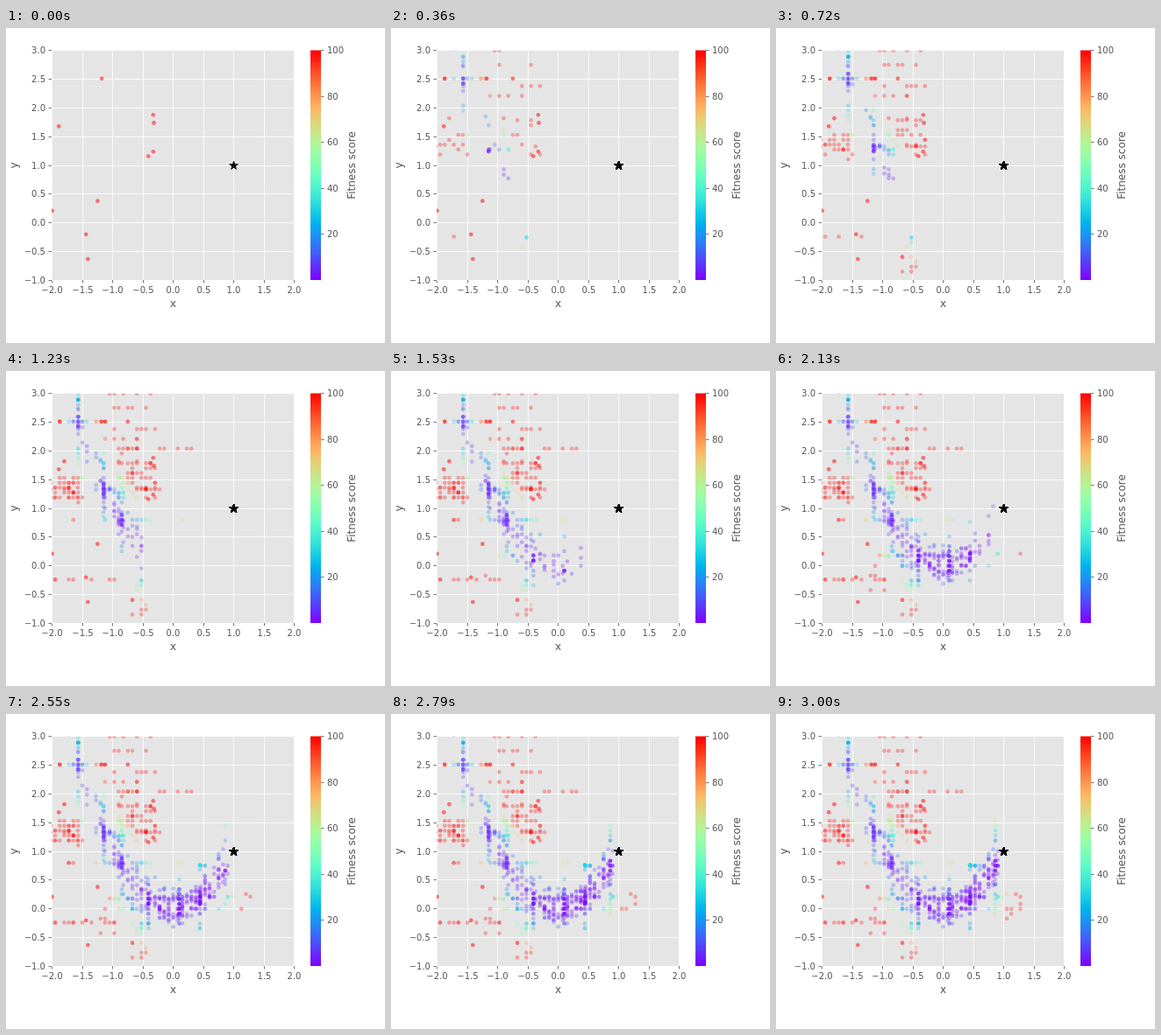
Animation, 432 px wide and 360 px high, one loop 3030 ms. Source, as an HTML page:

```html
<!DOCTYPE html>
<html lang="en">
<head>
<meta charset="utf-8">
<title>Fitness search</title>
<style>
html, body { margin: 0; width: 100%; height: 100%; overflow: hidden; background: #fff; }
svg { display: block; width: 432px; height: 360px; }
text { font: 10px "DejaVu Sans", sans-serif; fill: #555; }
text.label { font-size: 12px; text-anchor: middle; }
</style>
</head>
<body>
<svg id="stage" viewBox="0 0 432 360">
  <defs>
    <clipPath id="plot"><rect x="52" y="25.5" width="276.5" height="262.5"/></clipPath>
    <linearGradient id="scale" x1="0" y1="1" x2="0" y2="0"></linearGradient>
  </defs>
  <rect x="52" y="25.5" width="276.5" height="262.5" fill="#e5e5e5"/>
  <g id="axes"></g>
  <rect x="347" y="25.5" width="12" height="262.5" fill="url(#scale)"/>
  <text class="label" x="190.5" y="319">x</text>
  <text class="label" transform="translate(13 157) rotate(-90)">y</text>
  <text class="label" transform="translate(398 157) rotate(-90)">Fitness score</text>
  <g id="dots" clip-path="url(#plot)"></g>
  <g id="stars"></g>
</svg>
<script>
const $ = id => document.getElementById(id);
const FRAME = 30, FRAMES = 101;

function add(parent, tag, attrs, text = '') {
  const el = document.createElementNS('http://www.w3.org/2000/svg', tag);
  for (const k in attrs) el.setAttribute(k, attrs[k]);
  el.textContent = text;
  return parent.appendChild(el);
}

let seed = 11;
const rand = () => (seed = seed * 16807 % 2147483647) / 2147483647;
const between = (a, b) => a + (b - a) * rand();
const snap = (v, step) => Math.round(v / step) * step;

const toX = x => 190.6 + 69 * x, toY = y => 222.65 - 65.65 * y;

function rainbow(t) {
  const c = [Math.min(1, Math.abs(2 * t - .5)), Math.sin(Math.PI * t), Math.cos(Math.PI * t / 2)];
  return `rgb(${c.map(v => Math.round(255 * v))})`;
}

// Rosenbrock valley, capped at 100
const fitness = (x, y) => Math.min(100, (1 - x) ** 2 + 100 * (y - x * x) ** 2);

// Axes
const axes = $('axes');
const line = (x1, y1, x2, y2, stroke) => add(axes, 'line', { x1, y1, x2, y2, stroke, 'stroke-width': .8 });
const label = v => v.toFixed(1).replace('-', '\u2212');
for (let i = 0; i < 9; i++) {
  const x = -2 + i / 2, y = -1 + i / 2;
  const px = Math.floor(toX(x)) + .5, py = Math.floor(toY(y)) + .5;
  line(px, 25.5, px, 288, '#fff');
  line(px, 288, px, 291.5, '#555');
  line(52, py, 328.5, py, '#fff');
  line(48.5, py, 52, py, '#555');
  add(axes, 'text', { x: px, y: 303, 'text-anchor': 'middle' }, label(x));
  add(axes, 'text', { x: 45, y: py + 3.5, 'text-anchor': 'end' }, label(y));
}
for (let v = 20; v <= 100; v += 20) {
  const py = Math.floor(288 - 2.625 * v) + .5;
  line(359, py, 362.5, py, '#555');
  add(axes, 'text', { x: 366, y: py + 3.5 }, v);
}
for (let i = 0; i <= 20; i++) add($('scale'), 'stop', { offset: i / 20, 'stop-color': rainbow(i / 20) });

// Individuals stay on the plot once born
const people = [];
const birth = (x, y, at, times = 1) => {
  while (times--) people.push({ x, y, at: Math.floor(at) });
};

// Crossovers share coordinates, so they fall on a loose lattice
function cross(n, from, to, x0, x1, y0, y1) {
  while (n--) {
    const x = x0 === x1 ? x0 : snap(between(x0, x1), .075);
    const y = y0 === y1 ? y0 : snap(between(y0, y1), .085);
    birth(x, y, between(from, to + 1));
  }
}

// Mutations scatter around the valley floor y = x²
function mutate(n, from, to, x0, x1) {
  while (n--) {
    const x = snap(between(x0, x1), .075);
    birth(x, x * x + between(-.4, .5) * between(.3, 1), between(from, to + 1));
  }
}

const founders = [
  [-1.18, 2.51], [-1.89, 1.68], [-.33, 1.88], [-.32, 1.74], [-.33, 1.24],
  [-.41, 1.16], [-1.25, .38], [-1.44, -.2], [-1.41, -.63], [-2, .21]
];
for (const [x, y] of founders) birth(x, y, 0, 2);

// Best individual of each era, with the reach of its row and column
const elites = [
  { x: -1.57, y: 2.51, from: 1, to: 22, row: [-1.9, -.6], col: [1.1, 3], kids: 4 },
  { x: -1.15, y: 1.33, from: 6, to: 38, row: [-2, -.2], col: [.85, 1.95], kids: 26 },
  { x: -.85, y: .8, from: 25, to: 48, row: [-2, .4], col: [.1, 2.1], kids: 30 },
  { x: -.41, y: .18, from: 42, to: 64, row: [-1.1, .15], col: [-.4, .6], kids: 34 },
  { x: .1, y: 0, from: 46, to: 80, row: [-.9, .8], col: [-.3, .6], kids: 60 },
  { x: .44, y: .21, from: 62, to: 88, row: [-.3, 1.25], col: [-.35, .9], kids: 48 },
  { x: .86, y: .75, from: 78, to: 100, row: [.4, .95], col: [-.1, 1.5], kids: 44 }
];
for (const { x, y, from, to, row, col, kids } of elites) {
  const span = (to - from) / 4;
  for (let k = -1; k <= 1; k++) birth(x, y + k * .085, from + span * (k + 1.5), 4);
  cross(17, from, to, ...row, y, y);
  cross(19, from, to, x, x, ...col);
  mutate(kids, from, to, x - .4, Math.min(x + .4, .9));
}

// Poor offspring of the founders
for (const [i, y] of [3, 2.75, 2.38, 2.21, 1.82].entries()) cross(5, 1, 22, i < 3 ? -1.1 : -2, -.3, y, y);
cross(38, 1, 38, -2, -1.5, 1.15, 1.55);
cross(50, 4, 40, -.95, -.3, 1.15, 1.85);
cross(13, 25, 40, -.95, .35, 2.04, 2.04);
cross(12, 3, 24, -.7, -.4, -.9, -.25);
cross(12, 3, 66, -2, -1, -.24, -.24);
cross(16, 40, 75, -1.3, -.5, -.45, .3);
cross(8, 80, 100, 1.05, 1.3, -.25, .3);

people.sort((a, b) => a.at - b.at);
const items = people.map(({ x, y, at }) => ({
  at,
  el: add($('dots'), 'circle', {
    cx: toX(x), cy: toY(y), r: 2.35, fill: rainbow(fitness(x, y) / 100), 'fill-opacity': .3
  })
}));

// Goal marker, repainted each generation so its edges harden
const star = [...Array(10).keys()].map(i => {
  const r = i % 2 ? 1.95 : 5.1, a = Math.PI * (i / 5 - .5);
  return [toX(1) + r * Math.cos(a), toY(1) + .3 + r * Math.sin(a)].map(v => v.toFixed(2));
}).join(' ');
for (let at = 0; at < 12; at++) {
  items.push({ at, el: add($('stars'), 'polygon', { points: star, stroke: '#000', 'stroke-width': .8 }) });
}

let shown = -1;
const start = performance.now();
function draw() {
  const n = Math.floor((performance.now() - start) / FRAME) % FRAMES;
  if (n !== shown) {
    for (const { el, at } of items) el.style.display = at <= n ? '' : 'none';
    shown = n;
  }
  requestAnimationFrame(draw);
}
draw();
</script>
</body>
</html>
```
